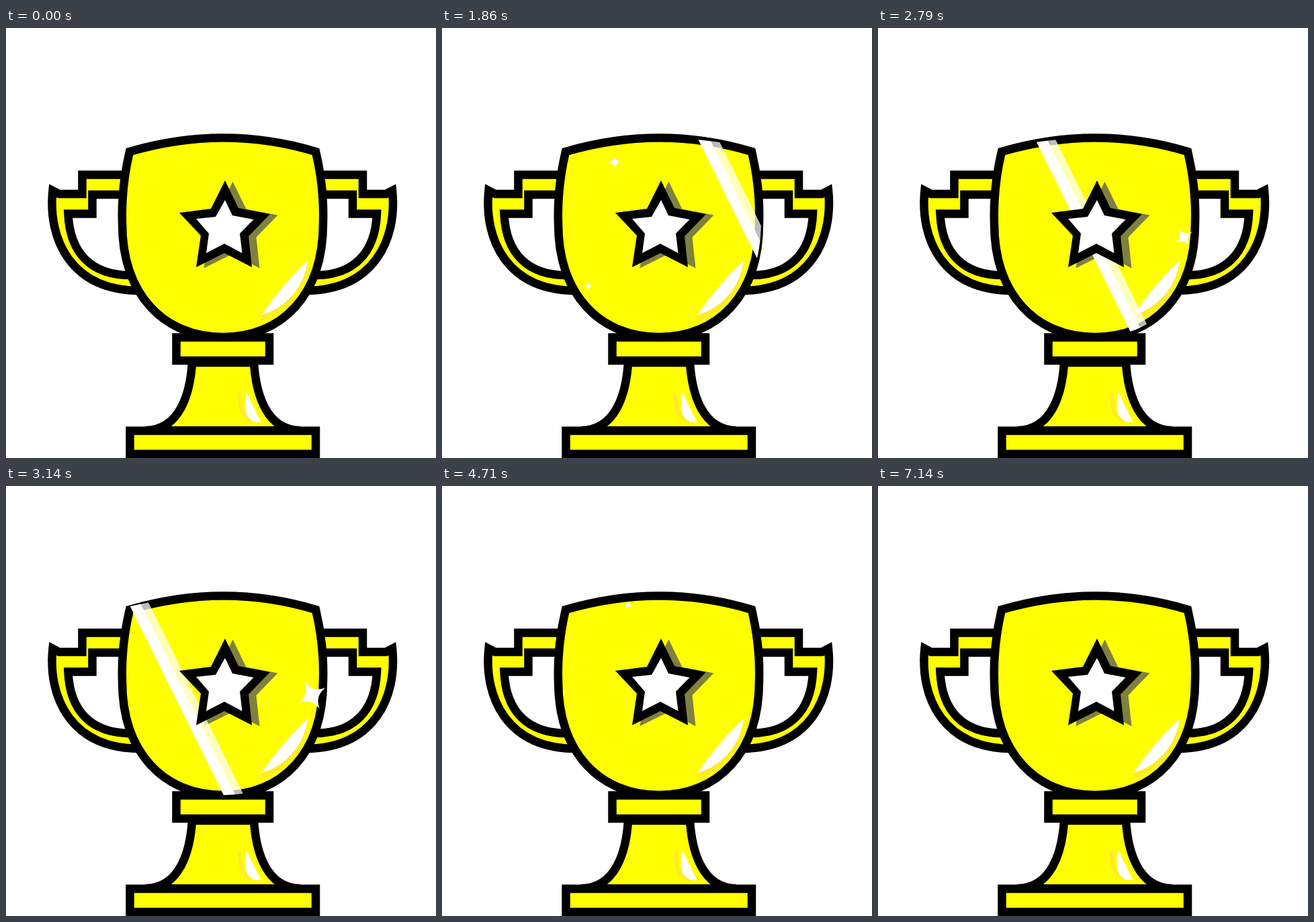
Animation of 640x640 px, one loop 7.21 s. Source, as an HTML page:

```html
<!DOCTYPE html>
<html lang="en">
<head>
<meta charset="utf-8">
<title>Trophy</title>
<style>
  html, body { margin: 0; width: 100%; height: 100%; overflow: hidden; background: #fff; }
  svg { display: block; width: 100%; height: 100%; }
  .part { fill: #ff0; stroke: #000; stroke-width: 12.5; stroke-miterlimit: 10; }
  .gold { fill: #ffec26; }
  .white { fill: #fff; }
</style>
</head>
<body>
<svg viewBox="0 0 640 640">
  <defs>
    <clipPath id="cupClip">
      <path d="M180 180Q325 147 465 180C473 220 476 258 475 290C474 398 412 460 323 460C234 460 171 398 170 290C169 255 172 220 180 180Z"/>
    </clipPath>
    <path id="handle" d="M185 218.5H113.5V247H79L69.5 242C62 315 97 391 200 391V368H185C127 368 95 335 92.5 276.5H128.5V248H185Z"/>
    <path id="star" d="M326 227L346 268L393 277L361 310L366 356L325 335L283 356L290 309L258 275L305 269Z"/>
  </defs>

  <use href="#handle" class="part"/>
  <use href="#handle" class="part" transform="translate(644.5 0) scale(-1 1)"/>
  <path class="part" d="M277 498C274 545 258 599 207 599H438C388 599 372 545 369 498Z"/>
  <rect class="part" x="184.5" y="599.5" width="276.5" height="34.5"/>
  <rect class="part" x="253.5" y="460.5" width="138.5" height="34.5"/>
  <path class="part" d="M184 184Q325 143 461 184C470 222 473 258 472 290C472 398 410 460 323 460C236 460 173 398 173 290C172 257 175 222 184 184Z"/>

  <path class="gold" d="M345 542Q343 583 368 587Q352 575 350 546Z"/>
  <path class="white" d="M358 542Q370 568 380 587C352 588 354 560 358 542Z"/>
  <path class="gold" d="M449 347C448 390 420 425 378 436L381 426Z"/>
  <use href="#star" transform="translate(11.5 1.5)" fill="#808040"/>

  <g clip-path="url(#cupClip)">
    <g id="shine" class="white">
      <path d="M0 163H18L176.4 483H158.4Z"/>
      <path d="M18 163H30L188.4 483H176.4Z" opacity=".74"/>
    </g>
  </g>

  <path class="white" d="M449 346C445 385 415 418 380 427Q411 382 449 346Z"/>
  <use href="#star"/>
  <path class="white" d="M326 256L337 279L368.5 285L348 306L351.5 335L325 321L298 335L302 306L283 284L312 281Z"/>
  <g id="sparkles" class="white"></g>
</svg>
<script>
const LOOP = 7210;
const STEP = LOOP / 101;
const SPIN = 0.012; // degrees per ms

const shine = document.getElementById('shine');
const layer = document.getElementById('sparkles');

// time, x of the shine
const shineKeys = [[1425, 401], [1860, 379.5], [2430, 290], [3140, 177], [3710, 102], [4000, 76], [4420, 57]];

const sparkles = [
  { x: 257, y: 199.5, r: 20.5, angle: 73, start: 0, peak: 1100, end: 2200 },
  { x: 218, y: 384, r: 16, angle: 73, start: 720, peak: 1290, end: 2050 },
  { x: 455.5, y: 311.5, r: 23.5, angle: 62, start: 2430, peak: 3250, end: 4360 },
  { x: 277, y: 177, r: 17, angle: 41, start: 4430, peak: 5500, end: 6500 },
  { x: 281, y: 543.5, r: 25, angle: 32, start: 5140, peak: 6300, end: 7140 }
];

for (const s of sparkles) {
  s.node = document.createElementNS('http://www.w3.org/2000/svg', 'path');
  s.node.setAttribute('d', 'M1 0Q.12 .12 0 1Q-.12 .12 -1 0Q-.12 -.12 0 -1Q.12 -.12 1 0Z');
  layer.appendChild(s.node);
}

function slope(keys, i) {
  const a = keys[i - 1], b = keys[i + 1];
  return a && b ? (b[1] - a[1]) / (b[0] - a[0]) : 0;
}

// Smooth curve through the keys, at rest at both ends
function curve(keys, t) {
  const i = keys.findIndex((k, n) => n < keys.length - 1 && t <= keys[n + 1][0]);
  const [t0, v0] = keys[i], [t1, v1] = keys[i + 1];
  const d = t1 - t0, u = (t - t0) / d, ease = u * u * (3 - 2 * u);
  return v0 + (v1 - v0) * ease
    + d * u * (1 - u) * ((1 - u) * slope(keys, i) - u * slope(keys, i + 1));
}

function show(node, visible, transform) {
  node.setAttribute('visibility', visible ? 'visible' : 'hidden');
  if (visible) node.setAttribute('transform', transform());
}

function draw(t) {
  const first = shineKeys[0][0], last = shineKeys[shineKeys.length - 1][0];
  show(shine, t >= first && t < last, () => `translate(${curve(shineKeys, t)} 0)`);

  for (const s of sparkles) {
    const growth = Math.min((t - s.start) / (s.peak - s.start), (s.end - t) / (s.end - s.peak));
    show(s.node, growth > 0.01, () =>
      `translate(${s.x} ${s.y}) rotate(${s.angle + SPIN * (t - s.peak)}) scale(${s.r * Math.sin(growth * Math.PI / 2)})`);
  }
}

const begin = performance.now();

function tick() {
  const t = (performance.now() - begin) % LOOP;
  draw(Math.floor((t + 2) / STEP) % 101 * STEP);
  requestAnimationFrame(tick);
}
tick();
</script>
</body>
</html>
```
